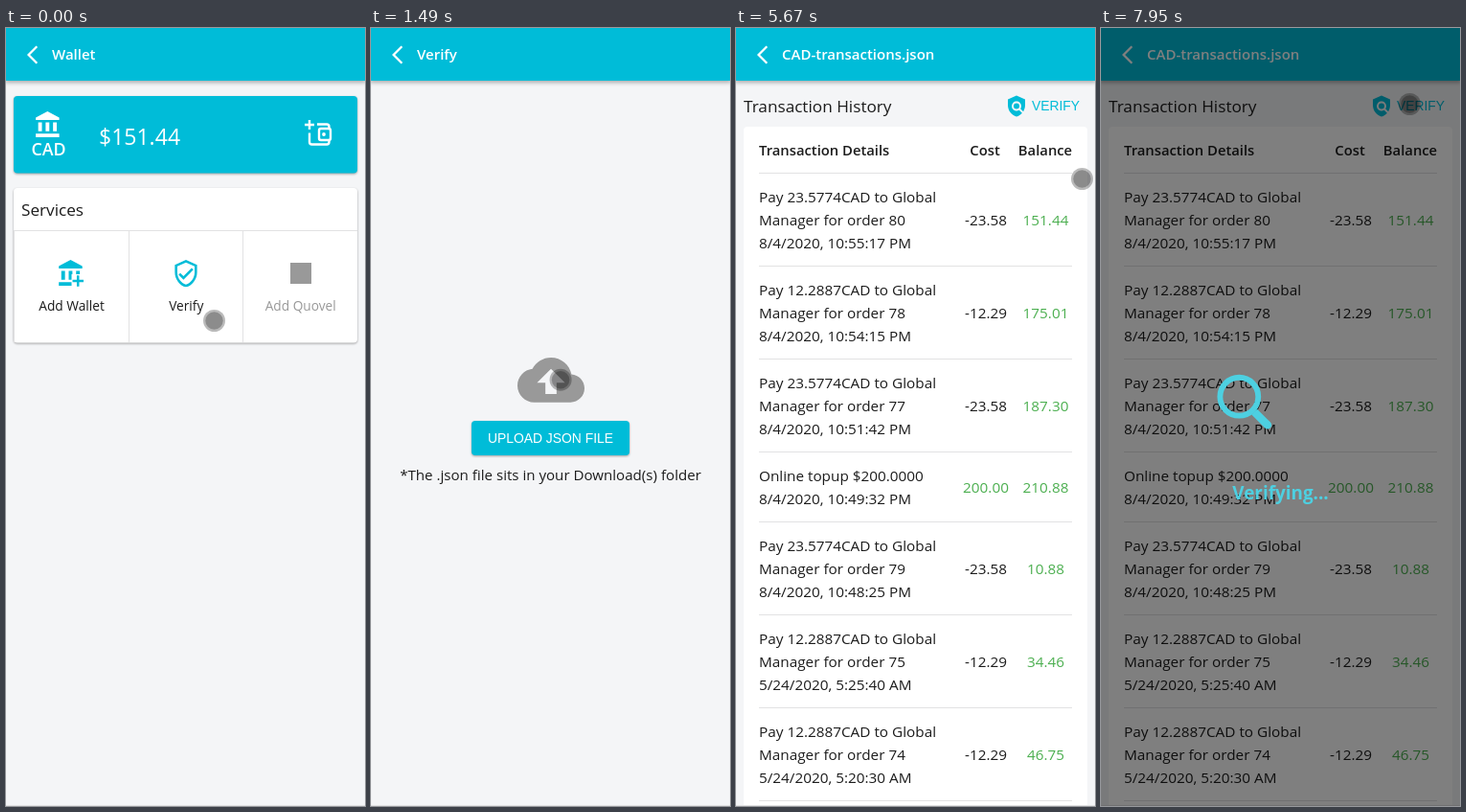
An HTML page for the animation above (8 s loop, 375 by 812 pixels).

```html
<!DOCTYPE html>
<html lang="en">
<head>
<meta charset="utf-8">
<title>Wallet</title>
<style>
html, body { margin: 0; width: 100%; height: 100%; overflow: hidden; background: #f4f5f7; }
svg { display: block; width: 375px; height: 812px; }
text { font: 15.3px "Open Sans", "Noto Sans", sans-serif; fill: #1c1c1c; white-space: pre; }
.title { font-size: 15px; font-weight: 600; fill: #fff; }
.heading { font-size: 17.2px; font-weight: 500; }
.label { font-size: 13.7px; font-weight: 500; }
.column { font-size: 14.8px; font-weight: 600; }
.button { font: 13.9px "Liberation Sans", Arial, sans-serif; }
.mid { text-anchor: middle; }
.page { fill: #f4f5f7; }
.white { fill: #fff; }
.gray { fill: #999; }
.cyan { fill: #00bcd8; }
.green { fill: #4caf50; }
.bar { filter: drop-shadow(0 2px 2px rgba(0,0,0,.3)); }
.card { filter: drop-shadow(0 1px 1px rgba(0,0,0,.35)); }
.line { stroke: #e2e2e3; fill: none; }
</style>
</head>
<body>
<svg id="stage" viewBox="0 0 375 812"></svg>
<script>
const LOOP = 8000;
const BANK = 'M4 10v7h3v-7H4zm6 0v7h3v-7h-3zM2 22h19v-3H2v3zm14-12v7h3v-7h-3zm-4.5-9L2 6v2h19V6l-9.5-5z';
const SHIELD = 'M12 1L3 5v6c0 5.55 3.84 10.74 9 12 5.16-1.26 9-6.45 9-12V5l-9-4zm7 10c0 4.52-2.98 8.69-7 9.93-4.02-1.24-7-5.41-7-9.93V6.3l7-3.11 7 3.11V11zm-11.59.59L6 13l4 4 8-8-1.41-1.42L10 14.17z';
const CLOUD = 'M19.35 10.04C18.67 6.59 15.64 4 12 4 9.11 4 6.6 5.64 5.35 8.04 2.34 8.36 0 10.91 0 14c0 3.31 2.69 6 6 6h13c2.76 0 5-2.24 5-5 0-2.64-2.05-4.78-4.65-4.96zM14 13v4h-4v-4H7l5-5 5 5h-3z';
const POLICY = 'M21 5l-9-4-9 4v6c0 5.55 3.84 10.74 9 12 2.3-.56 4.33-1.9 5.88-3.71l-3.12-3.12c-1.94 1.29-4.58 1.07-6.29-.64-1.95-1.95-1.95-5.12 0-7.07 1.95-1.95 5.12-1.95 7.07 0 1.71 1.71 1.92 4.35.64 6.29l2.9 2.9C20.29 15.69 21 13.38 21 11V5zM9 12a3 3 0 1 0 6 0a3 3 0 1 0-6 0z';

const text = (x, y, str, cls = '', style = '') => `<text x="${x}" y="${y}" class="${cls}" style="${style}">${str}</text>`;
const rect = (x, y, w, h, cls, r = 0) => `<rect x="${x}" y="${y}" width="${w}" height="${h}" rx="${r}" class="${cls}"/>`;
const icon = (d, x, y, scale, cls) => `<path d="${d}" transform="translate(${x} ${y}) scale(${scale})" class="${cls}"/>`;
const header = title => rect(-1, -6, 377, 61, 'cyan bar') +
  '<path d="M32.3 19.3L23.6 28l8.7 8.7" fill="none" stroke="#fff" stroke-width="2.3"/>' +
  text(48, 33, title, 'title');

const walletPage = header('Wallet') +
  rect(8, 71, 359, 80.5, 'cyan card', 4) +
  icon(BANK, 28.5, 85.7, 1.29, 'white') +
  text(44.5, 133, 'CAD', 'mid white', 'font-size:17.8px;font-weight:600') +
  text(97, 122, '$151.44', 'white', 'font-size:23px') +
  `<g fill="none" stroke="#fff" stroke-width="2.4">
    <path d="M312 101h10M317 96v10M317 109.5V119q0 2.5 2.5 2.5H335q2.5 0 2.5-2.5V117M325 100.5H335q2.5 0 2.5 2.5V105"/>
    <rect x="327" y="105" width="12" height="12" rx="2"/></g>
    <circle cx="332" cy="111" r="1.9" fill="#fff"/>` +
  rect(8, 167, 359, 161.5, 'white card', 4) +
  text(16, 196, 'Services', 'heading') +
  '<path d="M8 211.5H367M8.5 211V328M128.5 211V328M247.5 211V328" class="line"/>' +
  icon(BANK, 52.6, 240.7, 1.29, 'cyan') +
  rect(68.5, 257, 14, 14, 'white') +
  '<path d="M69.5 264H81M75.2 258.3V269.7" stroke="#00bcd8" stroke-width="2.5"/>' +
  icon(SHIELD, 172.5, 240.7, 1.29, 'cyan') +
  rect(297, 245, 22, 22, 'gray') +
  text(68.5, 295, 'Add Wallet', 'label mid') +
  text(188.3, 295, 'Verify', 'label mid') +
  text(307.7, 295, 'Add Quovel', 'label mid gray');

const uploadForm = icon(CLOUD, 153, 332.3, 2.917, 'gray') +
  rect(105, 410, 165, 36, 'cyan card', 4) +
  `<clipPath id="clip">${rect(105, 410, 165, 36, '', 4)}</clipPath>
  <g clip-path="url(#clip)"><circle id="ripple" cx="188" cy="430" fill="#fff"/></g>` +
  text(187.5, 433, 'UPLOAD JSON FILE', 'button mid white') +
  text(187.5, 472, '*The .json file sits in your Download(s) folder', 'mid', 'font-size:15.1px');

const payment = (amount, order, date, cost, balance) =>
  ({ lines: [`Pay ${amount}CAD to Global`, `Manager for order ${order}`, date], cost, balance });
const rows = [
  payment('23.5774', 80, '8/4/2020, 10:55:17 PM', '-23.58', '151.44'),
  payment('12.2887', 78, '8/4/2020, 10:54:15 PM', '-12.29', '175.01'),
  payment('23.5774', 77, '8/4/2020, 10:51:42 PM', '-23.58', '187.30'),
  { lines: ['Online topup $200.0000', '8/4/2020, 10:49:32 PM'], cost: '200.00', balance: '210.88' },
  payment('23.5774', 79, '8/4/2020, 10:48:25 PM', '-23.58', '10.88'),
  payment('12.2887', 75, '5/24/2020, 5:25:40 AM', '-12.29', '34.46'),
  payment('12.2887', 74, '5/24/2020, 5:20:30 AM', '-12.29', '46.75'),
];
const rule = y => `<path d="M24 ${y - .5}H351" class="line"/>`;
let rowTop = 152;
const table = rule(rowTop) + rows.map(({ lines, cost, balance }) => {
  const height = lines.length * 24 + 25, middle = rowTop + height / 2 + 5.5;
  const row = lines.map((line, i) => text(24, rowTop + 30 + i * 24, line)).join('') +
    text(261, middle, cost, cost[0] === '-' ? 'mid' : 'mid green') +
    text(323.5, middle, balance, 'mid green') + rule(rowTop + height);
  rowTop += height;
  return row;
}).join('');

const historyPage = text(8, 88, 'Transaction History', 'heading') +
  icon(POLICY, 281, 69.5, 1, 'cyan') +
  text(334, 86, 'VERIFY', 'button mid cyan') +
  rect(8, 103, 359, 720, 'white', 4) +
  text(24, 133, 'Transaction Details', 'column') +
  text(260, 133, 'Cost', 'column mid') +
  text(323, 133, 'Balance', 'column mid') + table;

document.getElementById('stage').innerHTML = rect(0, 0, 375, 812, 'page') +
  `<g id="wallet">${walletPage}</g>
  <g id="verify"><g id="upload">${uploadForm}</g><g id="details">${historyPage}</g>${header('<tspan id="title"></tspan>')}</g>
  <path d="M0 811.5H375" class="line"/>
  <g id="overlay"><rect width="375" height="812" fill-opacity=".5"/>
    <g id="lens" fill="none" stroke="#4dd0e1"><g transform="scale(.945) translate(-20 -20)">
      <circle cx="44.2" cy="44.2" r="21.1" stroke-width="6.2"/>
      <path d="M61 61L75.6 75.6" stroke-width="8.8"/><circle cx="75.6" cy="75.6" r="2.2" stroke-width="4.4"/></g></g>
    ${text(187.5, 492, 'Verifying...', 'mid', 'font-size:18.9px;font-weight:700;fill:#4dd0e1')}</g>
  <g id="touch"><circle r="11.5" fill-opacity=".27"/><circle r="9.2" fill-opacity=".25"/></g>
  <path id="arrow" d="M0 0V16L3.7 12.6 6.3 18.5 9 17.3 6.4 11.6H11.3Z" transform="translate(188.9 260)" fill="#fff" stroke="#000"/>`;

const el = Object.fromEntries([...document.querySelectorAll('[id]')].map(e => [e.id, e]));
const progress = (t, from, to) => Math.max(0, Math.min(1, (t - from) / (to - from)));
const easeInOut = u => u < .5 ? 4 * u ** 3 : 1 - 4 * (1 - u) ** 3;
const show = (e, on) => { e.style.display = on ? '' : 'none'; };
const place = (e, x, y) => e.setAttribute('transform', `translate(${x} ${y})`);
const fade = (e, opacity) => e.setAttribute('opacity', opacity);

// Position along [time, x, y] points
function along(points, t) {
  let i = 0;
  while (i < points.length - 2 && t >= points[i + 1][0]) i++;
  const [a, b] = [points[i], points[i + 1]], u = progress(t, a[0], b[0]);
  return [a[1] + (b[1] - a[1]) * u, a[2] + (b[2] - a[2]) * u];
}

const touches = [
  { start: 0, end: 610, path: [[30, 217.5, 305.5], [170, 179, 239], [280, 188, 262]] },
  { start: 1440, end: 2450, path: [[1440, 189, 268], [1490, 198, 367], [1800, 222, 436], [2210, 188, 430]] },
  { start: 5670, end: LOOP, path: [[5690, 361.5, 157.5], [5900, 322.5, 79.5]] },
];

const LENS_PERIOD = 1060, LENS_START = 6715;
const lensPath = [[0, 105, 322], [1 / 3, 138, 402], [2 / 3, 188, 322], [1, 105, 322]];

function draw(t) {
  const slide = easeInOut(progress(t, 690, 1390));
  place(el.wallet, -375 * slide, 0);
  fade(el.wallet, 1 - slide);
  place(el.verify, 375 * (1 - slide), 0);
  fade(el.verify, slide);
  el.title.textContent = t < 4560 ? 'Verify' : 'CAD-transactions.json';
  show(el.upload, t < 4740);
  show(el.details, t >= 4740);

  const press = progress(t, 2240, 2590);
  el.ripple.setAttribute('r', 95 * press);
  fade(el.ripple, .3 * (1 - press));

  fade(el.overlay, progress(t, 6470, 6685));
  place(el.lens, ...along(lensPath, ((t - LENS_START) / LENS_PERIOD + 10) % 1));

  const touch = touches.find(({ start, end }) => t >= start && t < end);
  show(el.touch, touch);
  if (touch) place(el.touch, ...along(touch.path, t));
  show(el.arrow, t >= 610 && t < 1440);
}

function tick() {
  draw(performance.now() % LOOP);
  requestAnimationFrame(tick);
}
tick();
</script>
</body>
</html>
```
